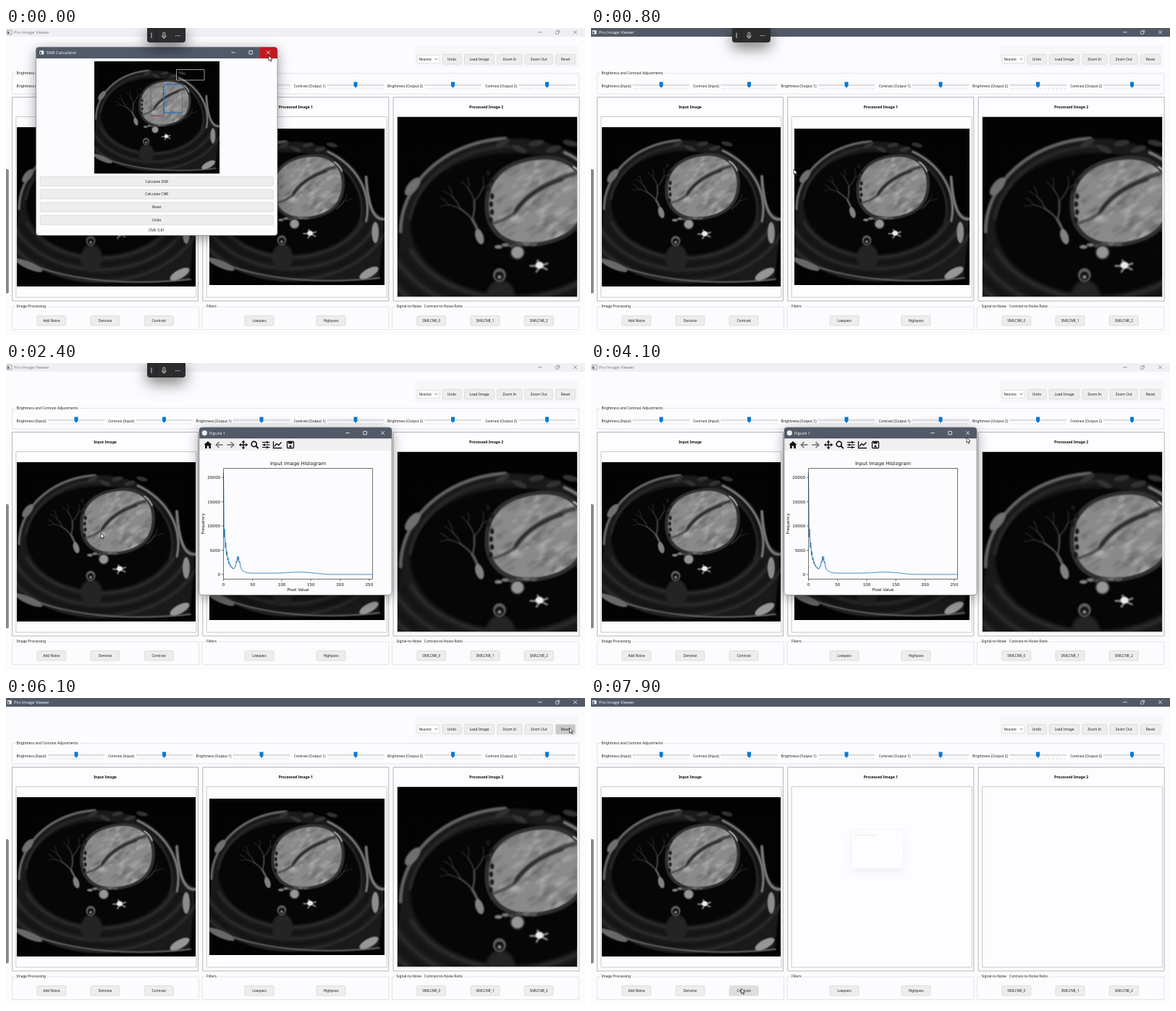
An HTML page with a canvas for the animation above (8 s loop, 800 px wide and 424 px high).

```html
<!DOCTYPE html>
<html lang="en">
<head>
<meta charset="utf-8">
<title>Pro Image Viewer</title>
<style>
html, body { margin: 0; width: 800px; height: 424px; overflow: hidden; background: #fcfbfd; }
canvas { display: block; width: 800px; height: 424px; }
</style>
</head>
<body>
<canvas id="stage"></canvas>
<script>
const W = 800, H = 424, LOOP = 8000, STEP = 100, PI = Math.PI;
const UI = '"Noto Sans", "Open Sans", sans-serif';
const TITLE = '"Open Sans", "Noto Sans", sans-serif';
const PLOT = '"DejaVu Sans", sans-serif';
const INK = '#111', BAR = '#525a68', PAPER = '#fcfbfd';
const stage = document.getElementById('stage');
const dpr = window.devicePixelRatio || 1;
stage.width = W * dpr;
stage.height = H * dpr;
const c = stage.getContext('2d');

let seed = 7;
const rnd = () => (seed = (seed * 16807) % 2147483647) / 2147483647;

// ---------- helpers ----------
function text(s, x, y, size = 4.85, color = '#222', align = 'left', font = UI, weight = 400) {
  c.font = `${weight} ${size}px ${font}`;
  c.fillStyle = color;
  c.textAlign = align;
  c.fillText(s, x, y);
}
function box(x, y, w, h, fill, stroke, r = 0, lw = 0.6) {
  c.beginPath();
  c.roundRect(x, y, w, h, r);
  if (fill) { c.fillStyle = fill; c.fill(); }
  if (stroke) { c.strokeStyle = stroke; c.lineWidth = lw; c.stroke(); }
}
function line(color, lw, ...pts) {
  c.beginPath();
  pts.forEach(p => c.lineTo(...p));
  c.strokeStyle = color;
  c.lineWidth = lw;
  c.stroke();
}
function shape(fill, ...pts) {
  c.beginPath();
  pts.forEach(p => c.lineTo(...p));
  c.closePath();
  c.fillStyle = fill;
  c.fill();
}
function disc(x, y, r, fill) {
  c.beginPath();
  c.arc(x, y, r, 0, 7);
  c.fillStyle = fill;
  c.fill();
}
function shadow(blur, alpha, dy) {
  c.shadowColor = `rgba(0,0,0,${alpha})`;
  c.shadowBlur = blur * dpr;
  c.shadowOffsetY = dy * dpr;
}

// ---------- scan picture: soft ellipses, arcs and seeded streaks ----------
function paintScan() {
  const S = 3, cv = document.createElement('canvas');
  cv.width = 247 * S;
  cv.height = 220 * S;
  const g = cv.getContext('2d');
  g.fillStyle = '#030303';
  g.fillRect(0, 0, cv.width, cv.height);
  g.scale(S, S);
  g.translate(-15, -137);
  g.lineCap = 'round';
  const gray = (v, a = 1) => `rgba(${v},${v},${v},${a})`;
  const soft = b => { g.filter = b ? `blur(${b * S}px)` : 'none'; };
  const fill = v => { g.fillStyle = gray(v); g.fill(); };
  const stroke = (v, w, a = 1) => { g.strokeStyle = gray(v, a); g.lineWidth = w; g.stroke(); };
  const spot = (x, y, rx, ry, v, tilt = 0) => {
    g.beginPath();
    g.ellipse(x, y, rx, ry, tilt, 0, 7);
    fill(v);
  };
  const arc = (y, rx, ry, from, to, v, w) => {
    g.beginPath();
    g.ellipse(130, y, rx, ry, 0, from * PI, to * PI);
    stroke(v, w);
  };
  const bend = (x1, y1, qx, qy, x2, y2, v, w) => {
    g.beginPath();
    g.moveTo(x1, y1);
    g.quadraticCurveTo(qx, qy, x2, y2);
    stroke(v, w);
  };

  // body outline, back muscles and lungs
  soft(1);
  g.beginPath();
  g.ellipse(130, 250, 112, 95, 0, PI, 2 * PI);
  g.lineTo(262, 262);
  g.lineTo(254, 348);
  g.quadraticCurveTo(110, 360, 10, 318);
  fill(26);
  soft(1.5);
  for (let i = 0; i < 5; i++) arc(240, 109 + i * 9, 78 + i * 8, 0.12, 0.88, i % 2 ? 20 : 44, 4);
  spot(130, 242, 102, 72, 6);
  spot(118, 318, 15, 19, 36);

  // fat and ribs
  soft(0.9);
  arc(250, 112, 95, 1, 1.48, 100, 3.5);
  arc(250, 104, 87, 1.05, 1.5, 38, 4);
  spot(30, 204, 11, 5, 112, -0.9);
  arc(250, 108, 92, 1.66, 2.06, 125, 3);
  arc(250, 100, 84, 1.65, 2.08, 36, 4);
  bend(236, 205, 240, 268, 262, 264, 120, 4);
  spot(249, 283, 5, 15, 140);
  for (let i = 0; i < 5; i++) spot(120 + i * 17, 160 + i % 2 * 6, 8, 3, 50, rnd() - 0.5);
  bend(15, 319, 110, 362, 255, 347, 105, 2);
  spot(32, 328, 20, 5, 105, 0.4);
  spot(240, 340, 15, 6, 150, -0.5);

  // branching lung vessels
  soft(0.7);
  function branch(x, y, dir, len, w) {
    if (w < 0.6) return;
    const x2 = x + Math.cos(dir) * len, y2 = y + Math.sin(dir) * len;
    bend(x, y, (x + x2) / 2 + 2, (y + y2) / 2, x2, y2, 45 + w * 18, w);
    branch(x2, y2, dir - 0.3 - rnd() * 0.3, len * 0.75, w * 0.62);
    branch(x2, y2, dir + 0.2 + rnd() * 0.3, len * 0.85, w * 0.66);
  }
  branch(98, 258, -1.95, 22, 2.8);
  spot(97, 255, 4, 8, 130, -0.3);
  branch(194, 250, -0.8, 15, 1.2);

  // heart: rounded polar shape with diagonal mottling
  const heart = k => {
    g.beginPath();
    for (let a = 0; a < 2 * PI; a += 0.1) {
      const r = k * (1 + 0.045 * Math.sin(2 * a + 0.2) ** 2 - 0.05 * Math.cos(a * 2 - 1.5));
      g.lineTo(154 + 49 * r * Math.cos(a), 219 + 43 * r * Math.sin(a));
    }
  };
  heart(1.06);
  fill(48);
  heart(0.97);
  fill(138);
  g.save();
  heart(0.97);
  g.clip();
  soft(1);
  for (let i = 0; i < 130; i++) {
    g.beginPath();
    g.ellipse(105 + rnd() * 98, 178 + rnd() * 84, 3 + rnd() * 6, 1 + rnd() * 2, -0.55, 0, 7);
    g.fillStyle = rnd() < 0.55 ? gray(195, 0.3) : gray(75, 0.25);
    g.fill();
  }
  bend(192, 191, 150, 204, 134, 228, 62, 4);
  bend(180, 197, 145, 208, 132, 231, 40, 2.5);
  bend(132, 231, 120, 240, 104, 243, 56, 2);
  g.restore();
  soft(0.7);
  for (let i = 0; i < 7; i++) spot(105 + rnd() * 5, 190 + i * 8, 2, 3, 25);
  bend(191, 184, 198, 188, 202, 197, 215, 1.5);
  for (let i = 0; i < 6; i++) spot(116 + i * 7, 262 + rnd() * 5, 4, 2, 70 + rnd() * 70);

  // aorta, vertebra and the bright vessel
  spot(135, 271, 7.5, 7.5, 50);
  spot(135, 271, 6, 6, 150);
  spot(117, 294, 6.5, 7, 95);
  spot(117, 295, 4.3, 4.5, 18);
  spot(117, 296, 2, 2, 130);
  for (let a = 0.6; a < 6; a += 1.3) bend(157, 284, 158, 285, 157 + 9 * Math.cos(a), 285 + 6 * Math.sin(a), 140, 2);
  spot(157, 284, 4, 3.5, 235);

  soft(0);
  for (let i = 0; i < 1200; i++) {
    g.fillStyle = gray(150, rnd() * 0.08);
    g.fillRect(16 + rnd() * 240, 165 + rnd() * 182, 1, 1);
  }
  return cv;
}
const scan = paintScan();

// ---------- widgets ----------
let mouse = [0, 0];
function button(label, x, y, w, h = 13.5, pressed = false) {
  const over = mouse[0] >= x && mouse[0] <= x + w && mouse[1] >= y && mouse[1] <= y + h;
  box(x, y, w, h, pressed ? '#c9c9c9' : over ? '#dedede' : '#ededee', '#cfcfd1', 1.5);
  text(label, x + w / 2, y + h / 2 + 1.8, 4.85, '#222', 'center');
}
function group(x, y, w, h, label) {
  box(x, y, w, h, null, '#d6d6d9', 0.5);
  c.font = `4.85px ${UI}`;
  c.fillStyle = PAPER;
  c.fillRect(x + 4.5, y - 2, c.measureText(label).width + 3, 4);
  text(label, x + 6, y + 1.4);
}
function buttonGroup(x, title, labels) {
  const w = 258, bw = 40, gap = (w - 1 - bw * labels.length) / (labels.length + 1);
  group(x, 385, w, 31.5, title);
  labels.forEach((s, i) => button(s, x + gap + i * (bw + gap), 397.5, bw));
}
function slider(label, x) {
  text(label, x - 41.5, 82.3, 4.85, '#222', 'right');
  box(x - 39, 78, 78, 1.6, '#e4e4e6', '#c6c6c9', 0, 0.4);
  c.fillStyle = '#a7a7aa';
  for (let i = -10; i <= 10; i++) c.fillRect(x + i * 3.65, 83.3, 0.6, 1.4);
  box(x - 2.5, 74.5, 5, 5.6, '#0b78d2');
  shape('#0b78d2', [x - 2.5, 80], [x + 2.5, 80], [x, 82.7]);
}
function cross(x, y, r, color) {
  line(color, 0.8, [x - r, y - r], [x + r, y + r]);
  line(color, 0.8, [x + r, y - r], [x - r, y + r]);
}
function windowButtons(right, y, color, restore) {
  const mid = right - 24.4, left = right - 48.5;
  line(color, 0.8, [left - 2.6, y], [left + 2.6, y]);
  if (restore) {
    box(mid - 2.5, y - 1.2, 3.8, 3.8, null, color);
    line(color, 0.6, [mid - 1, y - 2.5], [mid + 2.6, y - 2.5], [mid + 2.6, y + 1]);
  } else box(mid - 2.3, y - 2.3, 4.6, 4.6, null, color, 0.3, 0.8);
  cross(right, y, 2.4, color);
}
function appIcon(x, y) {
  box(x, y, 6.5, 5.8, '#f2f2f2', '#3a424c', 0.4, 0.5);
  box(x + 1, y + 1.8, 2, 3, '#4b5660');
}
function panel(x, title) {
  box(x, 95.5, 257, 281.5, '#fdfcfe', '#98989c', 0, 0.7);
  box(x + 5.3, 122.5, 249.2, 249.5, null, '#a6a6aa', 0.5);
  text(title, x + 128.5, 110.8, 5.1, INK, 'center', UI, 700);
}

// ---------- main window ----------
function mainWindow(active, t) {
  const ink = active ? '#fff' : '#777';
  box(0, 0, W, H, PAPER);
  box(0, 0, W, 12, active ? BAR : '#f0eff4');
  appIcon(1.5, 3);
  text('Pro Image Viewer', 11, 8.3, 6, ink, 'left', TITLE);
  windowButtons(786.5, 5.8, ink, true);

  box(565, 24, 226, 30, '#f7f6f8');
  box(568, 37.5, 31, 11, '#fff', '#cfcfd1', 0.6);
  text('Nearest', 570.5, 44.8, 4.75);
  line('#333', 0.7, [592.5, 42], [594.3, 43.8], [596.1, 42]);
  let x = 603;
  for (const [label, w] of [['Undo', 26], ['Load Image', 41], ['Zoom In', 34], ['Zoom Out', 38], ['Reset', 27]]) {
    button(label, x, 36.5, w, 13.5, label === 'Reset' && t >= 6000 && t < 6200);
    x += w + 4.4;
  }

  group(8.5, 62.5, 783, 28.5, 'Brightness and Contrast Adjustments');
  ['Input', 'Output 1', 'Output 2'].forEach((name, i) => {
    slider(`Brightness (${name})`, i ? 88.5 + i * 264.5 : 97);
    slider(`Contrast (${name})`, 218.5 + i * 264.5);
  });

  ['Input Image', 'Processed Image 1', 'Processed Image 2'].forEach((s, i) => panel(8.5 + i * 263.3, s));
  c.drawImage(scan, 15, 137, 247, 220);
  if (t < 6200) {
    c.drawImage(scan, 281, 139, 242, 216);
    c.save();
    c.beginPath();
    c.rect(541, 123, 248, 248);
    c.clip();
    box(541, 123, 248, 248, '#030303');
    c.drawImage(scan, 541, 127.8, 341, 299);
    c.restore();
  }

  buttonGroup(8.5, 'Image Processing', ['Add Noise', 'Denoise', 'Contrast']);
  buttonGroup(271, 'Filters', ['Lowpass', 'Highpass']);
  buttonGroup(533.5, 'Signal-to-Noise   Contrast-to-Noise Ratio', ['SNR,CNR_0', 'SNR,CNR_1', 'SNR,CNR_2']);
}

// ---------- pop-up windows ----------
function popup(x, y, w, h, alpha, draw) {
  const k = 0.9 + 0.1 * alpha, cx = x + w / 2, cy = y + h / 2;
  c.save();
  c.globalAlpha = alpha;
  c.translate(cx, cy);
  c.scale(k, k);
  c.translate(-cx, -cy);
  shadow(18, 0.4, 4);
  box(x, y, w, h, PAPER, null, 4);
  shadow(0, 0, 0);
  box(x, y, w, 15.5, BAR, null, [4, 4, 0, 0]);
  draw();
  box(x, y, w, h, null, '#686d78', 4);
  c.restore();
}
function snrWindow() {
  box(351, 26.5, 24, 15.5, '#c01822', null, [0, 4, 0, 0]);
  appIcon(46, 31);
  text('SNR Calculator', 56, 36.4, 6, '#fff', 'left', TITLE);
  windowButtons(362.5, 33.8, '#fff');
  c.drawImage(scan, 122, 46, 173, 155);
  box(235.5, 57.5, 38.5, 14.5, null, '#d8d8d8', 0, 0.7);
  box(200, 81, 17.5, 40.5, null, '#555');
  box(218, 78, 25.5, 39, null, '#666');
  c.setLineDash([2.5, 2]);
  line('#d32828', 1, [217.5, 80], [217.5, 121], [200, 121]);
  line('#1b78d8', 1.3, [243, 78], [218.5, 78], [218.5, 117], [243, 117]);
  c.setLineDash([]);
  ['Calculate SNR', 'Calculate CNR', 'Reset', 'Undo']
    .forEach((s, i) => button(s, 47.2, 205.2 + i * 17.85, 322, 13));
  text('CNR: 3.81', 208, 280.8, 4.85, '#222', 'center');
}

const bell = (v, mid, width) => Math.exp(-(((v - mid) / width) ** 2));
function count(v) {
  if (v === 0) return 20900;
  const zig = v % 2 ? 0.8 : 1.2;
  const peaks = 10500 * Math.exp(-v / 5.2) + 2500 * bell(v, 25, 4.2) + 220 * bell(v, 130, 24);
  return peaks * zig + 500 / (1 + Math.exp((v - 37) / 3)) + 260 / (1 + Math.exp((v - 165) / 6));
}
function toolIcons(y) {
  shape(INK, [273.5, y], [279, y - 5], [284.5, y]);
  box(275, y, 2.7, 5, INK);
  box(280.3, y, 2.7, 5, INK);
  box(275, y, 8, 1.5, INK);
  for (const [x, d] of [[295, -1], [310, 1]]) {
    line('#777', 1.7, [x - 4.5, y], [x + 4.5, y]);
    line('#777', 1.7, [x + d * 0.5, y - 4], [x + d * 4.7, y], [x + d * 0.5, y + 4]);
  }
  for (let i = 0; i < 4; i++) {
    c.save();
    c.translate(328, y);
    c.rotate(i * PI / 2);
    line(INK, 1.4, [0, 0], [5.5, 0]);
    shape(INK, [3.2, -2.5], [6, 0], [3.2, 2.5]);
    c.restore();
  }
  disc(342.7, y - 1, 4.4, INK);
  disc(342.7, y - 1, 2.7, '#f0f0f1');
  line(INK, 2, [345.2, y + 1.5], [348.7, y + 5]);
  for (let i = -1; i < 2; i++) {
    line(INK, 1.1, [354, y + i * 3.5], [364.5, y + i * 3.5]);
    box(i ? 360 : 356, y + i * 3.5 - 1.5, 1.8, 3, INK);
  }
  line(INK, 1.3, [369.5, y - 5], [369.5, y + 4.5], [381, y + 4.5]);
  line(INK, 1.4, [371, y + 2], [374, y - 1.5], [376.5, y + 0.5], [380.5, y - 3.5]);
  box(388.5, y - 4.5, 9, 9, null, INK, 1, 1.3);
  box(390, y - 4, 5.5, 2.5, INK);
  disc(393, y + 2, 1.6, INK);
}
function figureWindow() {
  disc(274.3, 96.6, 3.6, '#e8eef2');
  text('Figure 1', 281, 99, 6, '#fff', 'left', TITLE);
  windowButtons(520.5, 96.6, '#fff');
  box(267, 104.5, 266, 16.5, '#f0f0f1');
  toolIcons(113);

  const px = v => 300.5 + v * 0.8055, py = n => 292 - n * 0.0067;
  const label = (s, x, y, align = 'center', size = 5.6) => text(s, x, y, size, INK, align, PLOT);
  label('Input Image Histogram', 403.5, 141.3, 'center', 6.7);
  for (let n = 0; n <= 20000; n += 5000) {
    line(INK, 0.6, [298, py(n)], [300.5, py(n)]);
    label(n, 296, py(n) + 2.1, 'right');
  }
  for (let v = 0; v <= 250; v += 50) {
    line(INK, 0.6, [px(v), 298.5], [px(v), 301]);
    label(v, px(v), 307.5);
  }
  label('Pixel Value', 403.5, 315.2);
  c.save();
  c.translate(274, 222);
  c.rotate(-PI / 2);
  label('Frequency', 0, 0);
  c.restore();
  c.lineJoin = 'round';
  line('#1f77b4', 0.9, ...Array.from({ length: 256 }, (_, v) => [px(v), py(count(v))]));
  box(300.5, 145.5, 206, 153, null, INK);
}
function openingWindow() {
  const faint = '#f1f0f3';
  shadow(14, 0.05, 6);
  box(360, 182, 72, 53.5, '#fdfcfe', faint, 2);
  shadow(0, 0, 0);
  box(364, 188.5, 32, 2, faint);
  cross(423, 188, 2, faint);
}

// ---------- overlays ----------
function micBar() {
  shadow(20, 0.5, 8);
  box(195, -4, 53, 24, '#2c2c2e', null, 4);
  shadow(0, 0, 0);
  line('#ddd', 0.9, [201, 6.5], [201, 14]);
  line('#202022', 0.8, [207.8, 0], [207.8, 20]);
  box(216.9, 6, 2.8, 5.6, null, '#eee', 1.4, 0.8);
  c.beginPath();
  c.arc(218.3, 10.3, 3, 0.1, PI - 0.1);
  c.stroke();
  line('#eee', 0.8, [218.3, 13.3], [218.3, 15]);
  for (let i = -1; i < 2; i++) disc(237.4 + i * 2.6, 10.6, 0.7, '#eee');
}
function arrow([x, y]) {
  c.save();
  c.translate(x, y);
  shape('#fff', [0, 0], [0, 7.2], [1.7, 5.7], [2.9, 8.3], [4, 7.8], [2.9, 5.3], [5.1, 5.2]);
  c.strokeStyle = INK;
  c.lineWidth = 0.7;
  c.stroke();
  c.restore();
}

// ---------- timeline ----------
// each move: start, end, target x, target y
const moves = [[200, 800, 280, 195], [800, 1900, 131, 235], [2900, 3900, 519, 103],
  [4500, 5700, 778.5, 41], [6200, 7300, 207.5, 401]];
function mouseAt(t) {
  let x = 363, y = 38;
  for (const [from, to, tx, ty] of moves) {
    const u = Math.min(1, Math.max(0, (t - from) / (to - from))), k = u * u * (3 - 2 * u);
    x += (tx - x) * k;
    y += (ty - y) * k;
  }
  return [x, y];
}
const snrAlpha = t => t < 200 ? 1 : t < 300 ? 0.4 : 0;
const figureAlpha = t => t < 2100 || t >= 4300 ? 0 : t < 2200 ? 0.5 : t < 4200 ? 1 : 0.4;

function render(t) {
  c.setTransform(dpr, 0, 0, dpr, 0, 0);
  mouse = mouseAt(t);
  const snr = snrAlpha(t), fig = figureAlpha(t);
  mainWindow(snr < 1 && (fig === 0 || t >= 4200), t);
  if (snr) popup(41.5, 26.5, 333.5, 260, snr, snrWindow);
  if (fig) popup(267, 89, 266, 231.5, fig, figureWindow);
  if (t >= 7900) openingWindow();
  if (t < 3800) micBar();
  box(-4, 195, 7.8, 171.5, '#88888a', null, 2);
  arrow(mouse);
}
function tick() {
  const t = performance.now() % LOOP;
  render(Math.floor(t / STEP) * STEP);
  requestAnimationFrame(tick);
}
tick();
</script>
</body>
</html>
```
